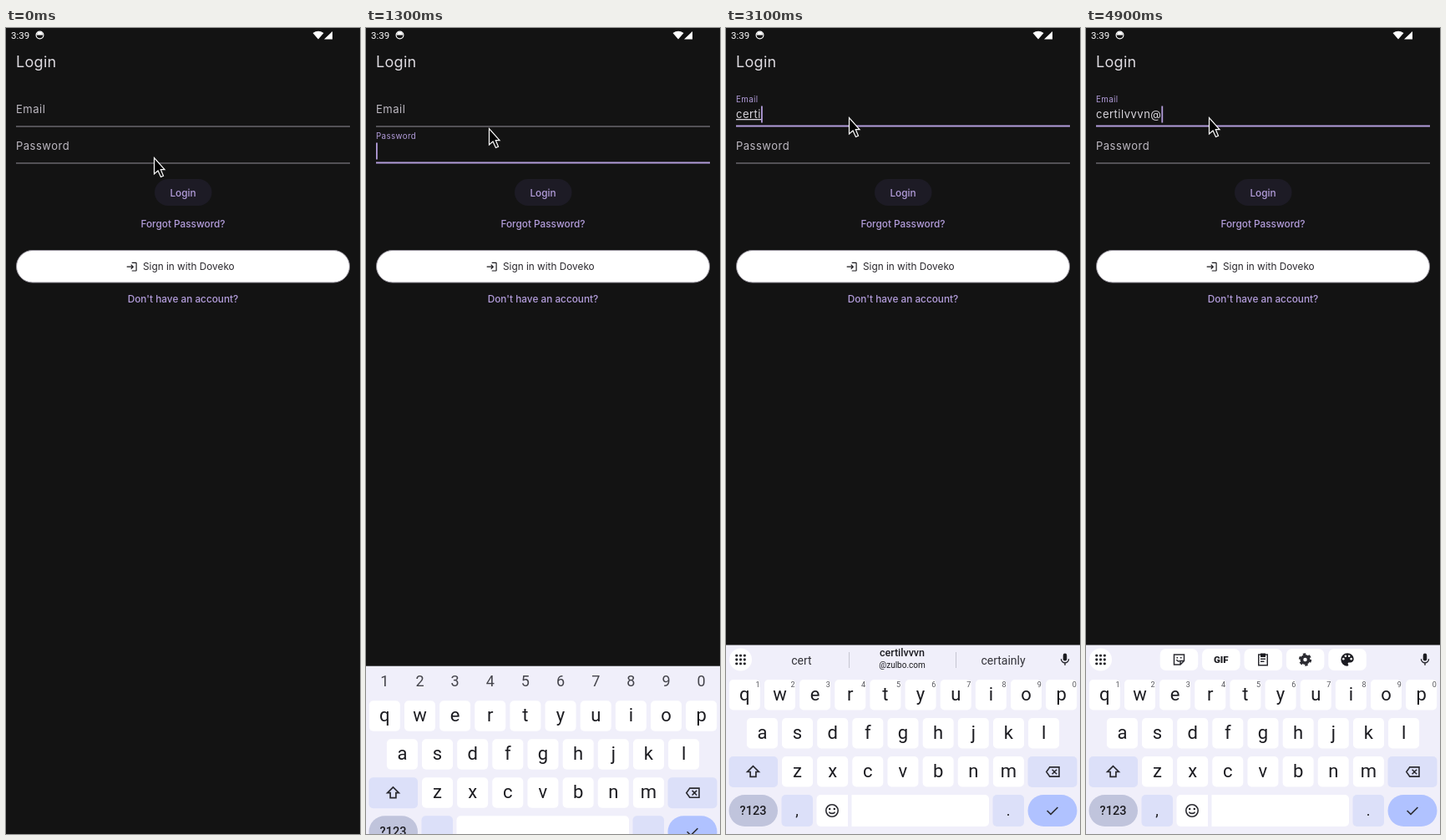
Animation, 424 px wide and 966 px high, one loop 5 s. Source, as an HTML page:

```html
<!DOCTYPE html>
<html lang="en">
<head>
<meta charset="utf-8">
<title>Login form</title>
<style>
  html, body { margin: 0; width: 100%; height: 100%; overflow: hidden; background: #131313; }
  svg { display: block; font-family: Inter, sans-serif; }
  .mid { text-anchor: middle; }
  .link { font-size: 11.8px; font-weight: 500; fill: #b39ddb; }
  .field { font-size: 13px; letter-spacing: .5px; }
  #keyboard, #status { font-family: Roboto, sans-serif; }
  #keyboard { fill: #1c1c21; }
  .letter { font-size: 22px; }
  .hint { font-size: 9px; fill: #55555c; }
  .digit { font-size: 18px; fill: #44444b; }
  .word { font-size: 14px; fill: #33333a; }
  .stroke { fill: none; stroke: #2b2b31; stroke-width: 2; }
</style>
</head>
<body>
<svg id="stage" width="424" height="966" viewBox="0 0 424 966">
  <rect width="424" height="966" fill="#131313"/>
  <g id="status" fill="#fff">
    <text x="6" y="13" font-size="11.5">3:39</text>
    <circle cx="40.5" cy="8.5" r="4.4" fill="none" stroke="#fff" stroke-width="1.2"/>
    <path d="M37 8.5a3.5 4 0 0 1 7 0z"/>
    <path d="M367.5 6Q374 1.500 380.500 6L374 13.500zM391 4V13.500H381z"/>
  </g>
  <text x="12" y="46.500" font-size="18" letter-spacing=".3" fill="#dedbe1">Login</text>
  <g id="fields"></g>
  <text id="typed" class="field" x="12" y="108" fill="#d8d5dc"></text>
  <rect id="caret" width="1.8" height="20" fill="#b39ddb"/>
  <rect x="178" y="181" width="68.500" height="32" rx="16" fill="#1d1b25"/>
  <text class="link mid" x="212" y="201.500">Login</text>
  <text class="link mid" x="212" y="239">Forgot Password?</text>
  <rect x="12.500" y="266.500" width="399" height="38.500" rx="19.250" fill="#fff" stroke="#938f99"/>
  <path transform="translate(143.500 279) scale(.6)" fill="#1c1b1f" d="M11 7 9.600 8.400l2.600 2.600H2v2h10.200l-2.600 2.600L11 17l5-5zm9 12h-8v2h8c1.100 0 2-.9 2-2V5c0-1.100-.9-2-2-2h-8v2h8z"/>
  <text x="164" y="290.300" font-size="11.8" fill="#2a282d">Sign in with Doveko</text>
  <text class="link mid" x="212" y="328.500">Don't have an account?</text>
  <g id="keyboard"></g>
  <path id="cursor" d="M.5.5V20L5 16l3.500 7.500 3-1.300L8.300 14.700H13z" fill="#000" stroke="#fff" stroke-width="1.200"/>
</svg>
<script>
const $ = id => document.getElementById(id);
const LOOP = 5000, STEP = 100, PITCH = 42.15;
const clamp = v => Math.max(0, Math.min(1, v));
const ease = v => (v = clamp(v), v * v * (3 - 2 * v));
const mix = (a, b, p) => a + (b - a) * p;
const mixColor = (a, b, p) => `rgb(${a.map((v, i) => Math.round(mix(v, b[i], p)))})`;
const show = (id, on) => $(id).style.display = on ? '' : 'none';

// Markup helpers
const text = (cls, x, y, s, extra = '') => `<text class="${cls} mid" x="${x}" y="${y}" ${extra}>${s}</text>`;
const box = (x, y, w, h, fill = '#fff', r = 5) =>
  `<rect x="${x}" y="${y}" width="${w}" height="${h}" rx="${r}" fill="${fill}"/>`;
const icon = (x, y, body, scale = .75) =>
  `<g transform="translate(${x} ${y}) scale(${scale}) translate(-12 -12)">${body}</g>`;
const line = d => `<path class="stroke" d="${d}"/>`;
const letters = (s, x, y) => [...s].map((c, i) =>
  box(x + i * PITCH - 18.5, y, 37, 36.5) + text('letter', x + i * PITCH, y + 25, c)).join('');
const row = (cls, dx, y) => [...'1234567890'].map((c, i) => text(cls, 22.3 + dx + i * PITCH, y, c)).join('');

const gear = '<circle class="stroke" cx="12" cy="12" r="5.5" style="stroke-width:5"/>' +
  '<circle class="stroke" cx="12" cy="12" r="8.7" stroke-dasharray="4.55" style="stroke-width:3"/>';
const palette = '<path d="M12 3a9 9 0 0 0 0 18c1.500 0 2-1.500 1.100-2.500-.9-1 0-2.500 1.100-2.500H16a5 5 0 0 0 5-5c0-4.400-4-8-9-8z"/>' +
  [[6.5, 11], [9.5, 7], [14.5, 7], [17.5, 11]].map(([x, y]) => `<circle cx="${x}" cy="${y}" r="1.500" fill="#fff"/>`).join('');
const mic = '<rect x="9" y="2" width="6" height="12" rx="3"/>' + line('M6 11a6 6 0 0 0 12 0M12 17v4');
const dots = [...Array(9).keys()].map(i =>
  `<rect x="${11.3 + i % 3 * 4.8}" y="${750.8 + Math.floor(i / 3) * 4.8}" width="2.800" height="2.800" rx=".8"/>`).join('');
const smile = '<circle class="stroke" cx="12" cy="12" r="9"/><circle cx="8.500" cy="9.500" r="1.500"/>' +
  '<circle cx="15.500" cy="9.500" r="1.500"/>' + line('M7.500 14a5 4 0 0 0 9 0');

$('keyboard').innerHTML =
  '<rect y="739.500" width="424" height="260" fill="#f0effa"/>' +
  letters('qwertyuiop', 22.3, 781) + letters('asdfghjkl', 43.4, 827) + letters('zxcvbnm', 85.5, 873) +
  box(3.5, 873, 58.5, 37, '#dce0f9') + icon(32.5, 891.5, line('M12 4 4 12h4v7h8v-7h4z'), .85) +
  box(361.5, 873, 59, 37, '#dce0f9') + icon(391, 891.5, line('M8 5h14v14H8L3 12zM11.500 8.500l7 7m0-7-7 7'), .8) +
  box(3.5, 919, 58.5, 38, '#c0c4dc', 19) + text('', 32.5, 943, '?123', 'font-size="14.5" font-weight="500"') +
  box(66.5, 919, 37.5, 38, '#dce0f9') + text('', 85, 944, ',', 'font-size="18"') +
  box(108.5, 919, 206.5, 38) +
  box(319.5, 919, 37.5, 38, '#dce0f9') + text('', 338, 944, '.', 'font-size="18"') +
  box(361.5, 919, 59, 38, '#b0c2ff', 19) + icon(391, 938, line('M4 12l5.500 5.500L20 7'), .8) +
  `<g id="numbers">${row('digit', 0, 764)}</g>` +
  `<g id="textMode">${row('hint', 15.7, 790)}
    <rect x="146" y="919" width="4.500" height="38" fill="#f0effa"/>${icon(127, 938, smile, .8)}
    <circle cx="17.500" cy="757" r="13.500" fill="#fff"/>${dots}${icon(406, 757, mic)}</g>` +
  '<g id="tools">' + [0, 1, 2, 3, 4].map(i => box(88.7 + i * 50.4, 744, 45.5, 26, '#fff', 7)).join('') +
    icon(111.5, 757, line('M4 4h16v10l-6 6H4zM14 20v-6h6M8 12q2 4 5 2') + '<path d="M8 8h2v2H8zM14 8h2v2h-2z"/>') +
    text('', 161.7, 761, 'GIF', 'font-size="11.5" font-weight="800"') +
    icon(212, 757, line('M5 4h14v17H5zM8 11h8M8 15h6') + '<path d="M8 2h8v6H8z"/>') +
    icon(262.5, 757, gear) + icon(313, 757, palette, .85) + '</g>' +
  '<g id="words"></g>';

const GRAY = [190, 186, 195], RULE = [147, 143, 153], PURPLE = [179, 157, 219];
const FIELDS = [['Email', 101.5, 118], ['Password', 145.5, 162]];
$('fields').innerHTML = FIELDS.map(([name, , y], i) =>
  `<text id="label${i}" class="field">${name}</text><rect id="rule${i}" x="12" width="400"/>`).join('');

function drawField(i, p) {
  const [, y, ruleY] = FIELDS[i], label = $('label' + i), rule = $('rule' + i);
  const tint = clamp(p * 2);
  label.setAttribute('transform', `translate(12 ${mix(y, y - 12.5, p)}) scale(${mix(1, .75, p)})`);
  label.setAttribute('fill', mixColor(GRAY, PURPLE, p));
  rule.setAttribute('y', ruleY - .5 - p);
  rule.setAttribute('height', 1 + p);
  rule.setAttribute('fill', mixColor(RULE, PURPLE, tint));
}

// Pointer stops: time, x, y
const PATH = [[0, 177, 155], [400, 167, 60], [700, 167, 60], [1000, 147, 132],
  [1100, 147, 126], [1300, 147, 120], [1600, 147, 107], [LOOP, 147, 107]];
function pointer(t) {
  const i = PATH.findIndex(k => k[0] > t), [a, b] = [PATH[i - 1], PATH[i]];
  const p = (t - a[0]) / (b[0] - a[0]);
  return [mix(a[1], b[1], p), mix(a[2], b[2], p)];
}

const USER = 'certilvvvn', ADDRESS = USER + '@';
const KEY_TIMES = [1900, 2100, 2300, 2900, 3100, 3300, 3500, 3700, 3900, 4400, 4800];
const GUESSES = [['can', 'could'], ['center', 'central'], ['', 'certain'], ['', 'certainly'], ['', 'certainly']];

function suggestions(typed) {
  const n = typed.length, wide = n > 5;
  const [left, mid, right] = wide ? [97.5, 225, 0] : [90.5, 211, 332];
  const [guess, last] = GUESSES[n - 1] || [];
  const center = guess ? text('word', mid, 763, guess) :
    text('', mid, 753, USER, 'font-size="12.5" font-weight="500"') + text('', mid, 767, '@zulbo.com', 'font-size="10"');
  const bars = [mid - 63.5, mid + 64.5].map(x => `<path d="M${x} 748v19" stroke="#c6c6d2"/>`).join('');
  return text('word', left, 763, n === 5 ? typed.slice(0, 4) : typed) + center + bars + (wide ? '' : text('word', right, 763, last));
}

function draw(t) {
  const onEmail = t >= 1700, onPassword = t >= 1100 && !onEmail;
  const toEmail = ease((t - 1630) / 167);
  drawField(0, toEmail);
  drawField(1, ease((t - 1062) / 167) * (1 - toEmail));

  const typed = ADDRESS.slice(0, KEY_TIMES.filter(k => k <= t).length);
  const composing = typed.length > 0 && typed !== ADDRESS;
  $('typed').textContent = typed;
  $('typed').style.textDecoration = composing ? 'underline' : 'none';
  show('caret', onEmail || onPassword);
  $('caret').setAttribute('x', 12 + (typed ? $('typed').getComputedTextLength() : 0));
  $('caret').setAttribute('y', onEmail ? 93.5 : 137.5);

  const slide = 227 * (1 - clamp((t - 1120) / 270)) ** 2;
  show('keyboard', slide < 227);
  $('keyboard').setAttribute('transform', `translate(0 ${slide})`);
  show('numbers', !onEmail);
  show('textMode', onEmail);
  show('tools', onEmail && !composing);
  $('words').innerHTML = composing ? suggestions(typed) : '';

  $('cursor').setAttribute('transform', `translate(${pointer(t)})`);
}

function tick() {
  draw(Math.floor(performance.now() % LOOP / STEP) * STEP);
  requestAnimationFrame(tick);
}
tick();
</script>
</body>
</html>
```
